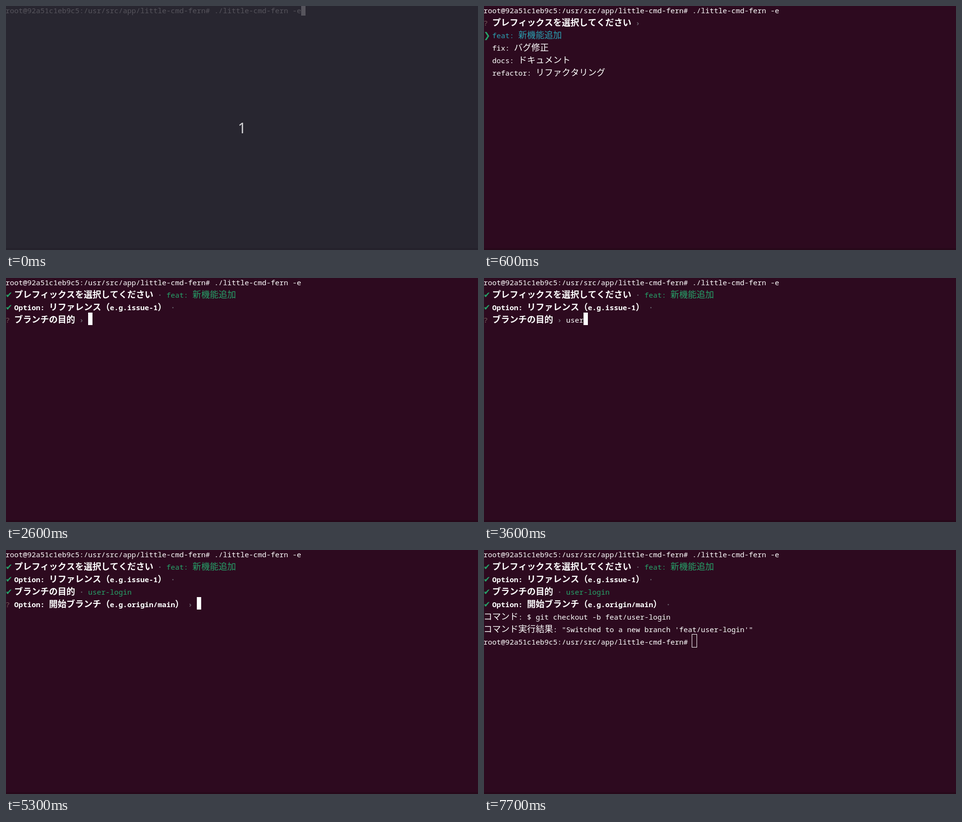
An HTML page with a canvas for the animation above (7.8 s loop, 977 by 508 pixels).

```html
<!DOCTYPE html>
<html lang="ja">
<head>
<meta charset="utf-8">
<title>Terminal session</title>
<style>
  html, body { margin: 0; width: 100%; height: 100%; overflow: hidden; background: #2d0a1f; }
  canvas { display: block; }
</style>
</head>
<body>
<canvas id="stage" width="977" height="508"></canvas>
<script>
const ctx = document.getElementById('stage').getContext('2d');
const LOOP = 7800;
const CELL = 9, ROW = 26, LEFT = -1, TOP = -6, BASELINE = 21;
const WHITE = '#ffffff', GREEN = '#26a269', CYAN = '#2aa1b3', DIM = '#66606a', ASK = '#765c5c';
const LATIN = '15px "Noto Sans Mono", "DejaVu Sans Mono", monospace';
const KANA = '18px "Noto Sans CJK JP", "Noto Sans CJK", sans-serif';
const SYMBOL = '17px "DejaVu Sans", sans-serif';

const TOOL = 'little-cmd-fern';
const PROMPT = `root@92a51c1eb9c5:/usr/src/app/${TOOL}# `;
const PREFIX = 'プレフィックスを選択してください';
const REFERENCE = 'Option: リファレンス（e.g.issue-1）';
const PURPOSE = 'ブランチの目的';
const START = 'Option: 開始ブランチ（e.g.origin/main）';
const CHOICES = ['feat: 新機能追加', 'fix: バグ修正', 'docs: ドキュメント', 'refactor: リファクタリング'];
const BRANCH = 'user-login';
const KEY_TIMES = [3200, 3400, 3500, 3600, 3800, 4100, 4300, 4500, 4600, 4800];

const isWide = ch => ch.charCodeAt(0) > 0x2e80;

function fontOf(ch, bold) {
  if ('✔❯'.includes(ch)) return SYMBOL;
  if (isWide(ch)) return (bold ? '700 ' : '400 ') + KANA;
  return (bold ? '700 ' : '500 ') + LATIN;
}

// Writes on the character grid and returns the next free column.
function write(row, col, text, color = WHITE, bold = false) {
  ctx.fillStyle = color;
  for (const ch of text) {
    ctx.font = fontOf(ch, bold);
    ctx.fillText(ch, LEFT + col * CELL, TOP + row * ROW + BASELINE);
    col += isWide(ch) ? 2 : 1;
  }
  return col;
}

function cursor(row, col, color = WHITE) {
  ctx.fillStyle = color;
  ctx.fillRect(LEFT + col * CELL, TOP + row * ROW, CELL, ROW);
}

function hollowCursor(row, col) {
  ctx.strokeStyle = WHITE;
  ctx.lineWidth = 1;
  ctx.strokeRect(LEFT + col * CELL - 0.5, TOP + row * ROW - 0.5, CELL + 1, ROW + 1);
}

function question(row, label, done, answer = '') {
  write(row, 0, done ? '✔' : '?', done ? GREEN : ASK);
  const col = write(row, 2, label, WHITE, true);
  write(row, col + 1, done ? '·' : '›', DIM, true);
  return write(row, col + 3, answer, done ? GREEN : WHITE);
}

function background(color, edge) {
  ctx.fillStyle = color;
  ctx.fillRect(0, 0, 977, 508);
  ctx.fillStyle = edge;
  ctx.fillRect(0, 504, 977, 4);
}

function command(color) {
  return write(0, 0, `${PROMPT}./${TOOL} -e`, color);
}

function countdown() {
  const faded = '#56545c';
  background('#282630', '#25222c');
  cursor(0, command(faded), faded);
  ctx.fillStyle = '#d4d3d6';
  ctx.font = '30px "Noto Sans", "Open Sans", sans-serif';
  ctx.textAlign = 'center';
  ctx.fillText('1', 488.5, 265);
  ctx.textAlign = 'left';
}

function menu() {
  question(1, PREFIX, false);
  CHOICES.forEach((choice, i) => {
    if (i === 0) write(2, 0, '❯', GREEN);
    write(2 + i, 2, choice, i === 0 ? CYAN : WHITE);
  });
}

function results(t) {
  write(5, 0, `コマンド: $ git checkout -b feat/${BRANCH}`);
  write(6, 0, `コマンド実行結果: "Switched to a new branch 'feat/${BRANCH}'"`);
  const col = write(7, 0, PROMPT);
  if (t >= 7700) hollowCursor(7, col);
  else if (t < 6600 || t >= 7200) cursor(7, col);
}

function draw(t) {
  if (t < 100) return countdown();
  background('#2d0a1f', '#27091a');
  const end = command(WHITE);
  if (t < 400) cursor(0, end);
  if (t < 600) return;
  if (t < 1500) return menu();

  question(1, PREFIX, true, CHOICES[0]);
  const refEnd = question(2, REFERENCE, t >= 2600);
  if (t < 2600) {
    if (t < 2000 || t >= 2500) cursor(2, refEnd);
    return;
  }

  const typed = BRANCH.slice(0, KEY_TIMES.filter(k => t >= k).length);
  const typedEnd = question(3, PURPOSE, t >= 5300, typed);
  if (t < 5300) return cursor(3, typedEnd);

  const startEnd = question(4, START, t >= 6000);
  if (t < 5800) cursor(4, startEnd);
  if (t >= 6000) results(t);
}

const began = performance.now();
function tick() {
  draw((performance.now() - began) % LOOP);
  requestAnimationFrame(tick);
}
tick();
</script>
</body>
</html>
```
